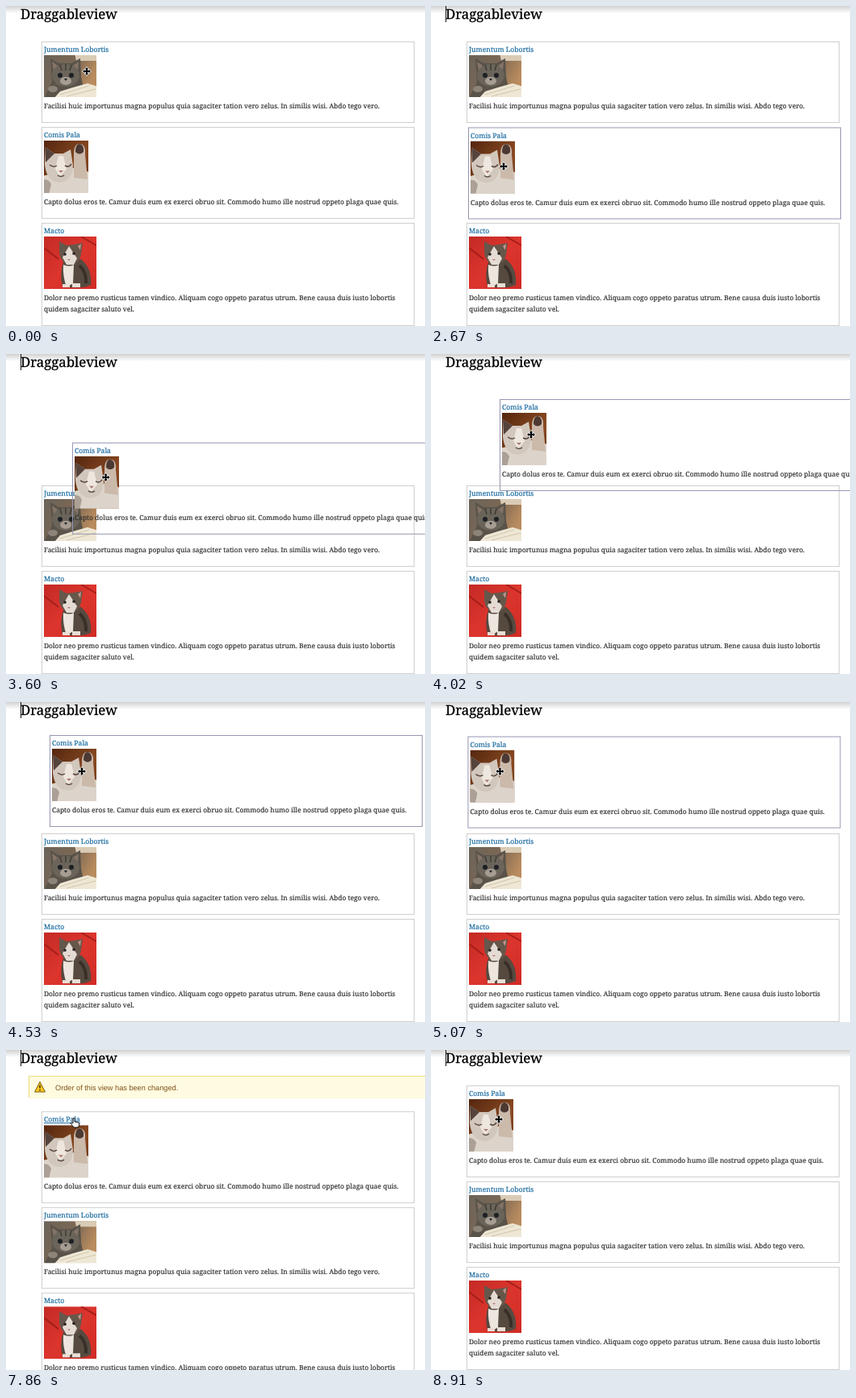
Animation of 519 by 397 pixels, one loop 8940 ms. Source, as an HTML page:

```html
<!DOCTYPE html>
<html lang="en">
<head>
<meta charset="utf-8">
<title>Draggableview</title>
<style>
  html, body { margin: 0; width: 100%; height: 100%; overflow: hidden; background: #fff; }
  svg { display: block; }
  text { font-family: "Noto Serif", serif; text-rendering: geometricPrecision; }
  .heading { font-size: 16.8px; fill: #000; stroke: #000; stroke-width: .3px; }
  .link { font-size: 8.63px; fill: #1c6ba0; stroke: #1c6ba0; stroke-width: .2px; }
  .hover .link { text-decoration: underline; }
  .body { font-size: 8.44px; fill: #333; stroke: #333; stroke-width: .2px; }
  .frame { fill: none; stroke: #cfcfd1; }
  .dragged .frame { stroke: #9696b2; }
  .notice { font: 9.2px "Liberation Sans", Arial, sans-serif; fill: #7d4f16; }
  .soft { filter: blur(.6px); }
</style>
</head>
<body>
<svg width="519" height="397" viewBox="0 0 519 397">
  <defs>
    <linearGradient id="shade" x2="0" y2="1">
      <stop stop-color="#d2d2d2"/><stop offset="1" stop-color="#fff"/>
    </linearGradient>
    <linearGradient id="room" x2="1" y2=".4">
      <stop stop-color="#6b6459"/><stop offset=".55" stop-color="#7b6754"/><stop offset="1" stop-color="#b98c5f"/>
    </linearGradient>
    <linearGradient id="wood" x2="1" y2="1">
      <stop stop-color="#54260f"/><stop offset=".6" stop-color="#8a4a22"/><stop offset="1" stop-color="#643115"/>
    </linearGradient>
    <linearGradient id="sofa" x2="1" y2="1">
      <stop stop-color="#c32a25"/><stop offset=".5" stop-color="#dc352d"/><stop offset="1" stop-color="#d02b25"/>
    </linearGradient>
    <clipPath id="wide"><path d="M0 0h65v52H0z"/></clipPath>
    <clipPath id="tall"><path d="M0 0h55v65H0z"/></clipPath>
    <clipPath id="square"><path d="M0 0h65v65H0z"/></clipPath>
    <clipPath id="reveal"><rect id="revealBox" x="28" y="32" width="491" height="0"/></clipPath>
  </defs>

  <rect width="519" height="9" fill="url(#shade)"/>
  <text class="heading" x="18" y="16">Draggableview</text>
  <path id="caret" d="M18.5 0v20" stroke="#111"/>

  <g clip-path="url(#reveal)">
    <rect x="28.5" y="32.5" width="500" height="27" fill="#fefbe0" stroke="#eddc7c"/>
    <path d="M42 39.500l6.500 12.500h-13z" fill="#fcc81e" stroke="#7c5b14" stroke-linejoin="round"/>
    <path d="M42 43.500v4M42 49v1.500" stroke="#3a2a08" stroke-width="1.500"/>
    <text class="notice" x="61" y="50">Order of this view has been changed.</text>
  </g>

  <g id="first">
    <rect class="frame" x=".5" y=".5" width="461" height="100"/>
    <text class="link" x="3" y="13">Jumentum Lobortis</text>
    <g transform="translate(3 17)" clip-path="url(#wide)">
      <path d="M0 0h65v52H0z" fill="url(#room)"/>
      <g class="soft">
        <path d="M38-2h29v9H40z" fill="#d9cbb5"/>
        <path d="M0 54L10 33 8 4l10 6h16L45 4l1 23 6 27z" fill="#59534a"/>
        <path d="M10 8l7 5-5 7zM43 8l-7 5 6 6z" fill="#857467"/>
        <ellipse cx="27" cy="25" rx="17" ry="14" fill="#6a645a"/>
        <path d="M20 12l2 7M27 11v8M34 12l-2 7" stroke="#403b35" stroke-width="1.500"/>
        <ellipse cx="27" cy="32" rx="7" ry="5" fill="#a79d92"/>
        <g fill="#1d2024"><circle cx="20" cy="25" r="3"/><circle cx="34" cy="25" r="3"/><path d="M25 29h4l-2 3z"/></g>
        <path d="M12 54l8-9 16-5 18-5 13 4v15z" fill="#eee7d5"/>
        <path d="M20 49l36-11M28 51l36-9" stroke="#d2c5a9"/>
        <ellipse cx="11" cy="42" rx="6" ry="4" fill="#8c8479"/>
      </g>
    </g>
    <text class="body" x="3" y="83">Facilisi huic importunus magna populus quia sagaciter tation vero zelus. In similis wisi. Abdo tego vero.</text>
  </g>

  <g id="third">
    <rect class="frame" x=".5" y=".5" width="461" height="127"/>
    <text class="link" x="3" y="13">Macto</text>
    <g transform="translate(3 17)" clip-path="url(#square)">
      <path d="M0 0h65v65H0z" fill="url(#sofa)"/>
      <g class="soft">
        <path d="M0 14l18 14M46 0l19 11" stroke="#a51e1a" stroke-width="2"/>
        <path d="M23 62q-4-16 1-30l22-4q14 12 12 32-12 6-35 2z" fill="#564a40"/>
        <path d="M19 20l0-14 9 5 9-1 11-2-2 14q-2 12-12 13-13-1-15-15z" fill="#66574b"/>
        <path d="M42 12l4-3-1 8z" fill="#c5968a"/>
        <path d="M31 12l-8 14 5 9 9 0 4-8z" fill="#e4dcd4"/>
        <path d="M24 35q8 3 13 0l-1 23-8 5q-5-14-4-28z" fill="#ece6df"/>
        <path d="M44 36q9 8 8 22" fill="none" stroke="#382f28" stroke-width="4"/>
        <path d="M23 59h9v4h-9zM35 58h10v5H35z" fill="#e7ded5"/>
        <g fill="#262320"><circle cx="26" cy="22" r="1.800"/><circle cx="37" cy="21" r="1.800"/></g>
        <path d="M29 28h4l-2 2z" fill="#b77b72"/>
      </g>
    </g>
    <text class="body" x="3" y="96">Dolor neo premo rusticus tamen vindico. Aliquam cogo oppeto paratus utrum. Bene causa duis iusto lobortis</text>
    <text class="body" x="3" y="110">quidem sagaciter saluto vel.</text>
  </g>

  <g id="second">
    <rect class="frame" x=".5" y=".5" width="461" height="113"/>
    <text class="link" x="3" y="13">Comis Pala</text>
    <g transform="translate(3 17)" clip-path="url(#tall)">
      <path d="M0 0h55v65H0z" fill="url(#wood)"/>
      <g class="soft">
        <path d="M-2 67V44l38-10q10-1 21 6v27z" fill="#dcd4ca"/>
        <path d="M37 46l0-29q0-13 7-13 8 0 7 13l3 31z" fill="#cbb9aa"/>
        <path d="M39 14q0-10 5-10 6 1 5 10-5 5-10 0z" fill="#4c3932"/>
        <path d="M1 30L1 8l12 8h11l9-5 3 20q-1 20-17 21Q3 50 1 30z" fill="#d2c7bc"/>
        <path d="M1 8l12 8-11 11z" fill="#55433c"/>
        <path d="M18 19l-4 16 6 10 8-10-4-16z" fill="#eee7df"/>
        <path d="M7 30q5 4 9 1M26 31q5 3 8-2M17 43q4 3 8 0" fill="none" stroke="#5b4b44" stroke-width="1.500"/>
        <path d="M18 37h6l-3 3z" fill="#ab7770"/>
        <path d="M-2 48q8-1 11 6l-3 13h-8z" fill="#aca096"/>
      </g>
    </g>
    <text class="body" x="3" y="96">Capto dolus eros te. Camur duis eum ex exerci obruo sit. Commodo humo ille nostrud oppeto plaga quae quis.</text>
  </g>

  <g id="cursor">
    <path id="move" d="M0-5L2.200-2.500H1V-1H2.500V-2.200L5 0 2.500 2.200V1H1V2.500H2.200L0 5-2.200 2.500H-1V1H-2.500V2.200L-5 0-2.500-2.200V-1H-1V-2.500H-2.200z" stroke="#fff" stroke-width="1.400" paint-order="stroke"/>
    <path id="hand" d="M-1-1Q0-2.500 1-1V3l5 1q1 1 .5 4L5 10H0L-4 5q0-2 3 0z" fill="#fff" stroke="#000" stroke-width=".9"/>
  </g>
</svg>
<script>
  const LOOP = 8940, STEP = 30;
  const GRAB = 2550, SWAP = 3600, DROP = 5250, NOTICE = 33;
  const start = performance.now();
  const el = id => document.getElementById(id);
  const place = (id, x, y) => el(id).setAttribute('transform', `translate(${x} ${y})`);
  const show = (id, on) => el(id).style.display = on ? '' : 'none';

  // time, x, y
  const pointer = [
    [1230, 100, 81], [1400, 140, 110], [1550, 163, 160], [1700, 135, 205], [1860, 97, 206],
    [2040, 97, 206], [2250, 88, 198], [2550, 88, 198], [2670, 90, 199], [3090, 110, 196],
    [3420, 120, 180], [3720, 126, 135], [4020, 124, 100], [4300, 110, 88], [4530, 94, 86],
    [5000, 86, 86], [5250, 84, 86]
  ];
  const card = [
    [2550, 44, 150], [2670, 46, 150.5], [3090, 64, 149], [3420, 76, 135], [3720, 86, 93],
    [4020, 85, 56], [4300, 70, 43], [4530, 54, 41], [5000, 46, 42], [5250, 44, 44]
  ];

  function along(track, t) {
    const next = track.findIndex(key => key[0] > t);
    if (next < 0) return track.at(-1).slice(1);
    if (next === 0) return track[0].slice(1);
    const a = track[next - 1], b = track[next];
    const k = (t - a[0]) / (b[0] - a[0]);
    return [1, 2].map(i => a[i] + (b[i] - a[i]) * k);
  }

  function swing(t, from, to) {
    const k = Math.min(1, Math.max(0, (t - from) / (to - from)));
    return (1 - Math.cos(Math.PI * k)) / 2;
  }

  function render(t) {
    const shift = NOTICE * (swing(t, 5370, 5970) - swing(t, 7770, 8640));
    const [x, y] = along(card, t);
    place('first', 44, (t < SWAP ? 44 : 163) + shift);
    place('second', x, y + shift);
    place('third', 44, 269 + shift);
    el('revealBox').setAttribute('height', 28 * shift / NOTICE);

    const overLink = shift > 25;
    el('second').classList.toggle('dragged', t >= GRAB && t < DROP);
    el('second').classList.toggle('hover', overLink);
    place('cursor', ...along(pointer, t));
    show('move', !overLink);
    show('hand', overLink);
    show('caret', (t - 210 + 1024) % 1024 < 510);
  }

  function tick() {
    const t = (performance.now() - start) % LOOP;
    render(Math.floor(t / STEP) * STEP);
    requestAnimationFrame(tick);
  }
  tick();
</script>
</body>
</html>
```
